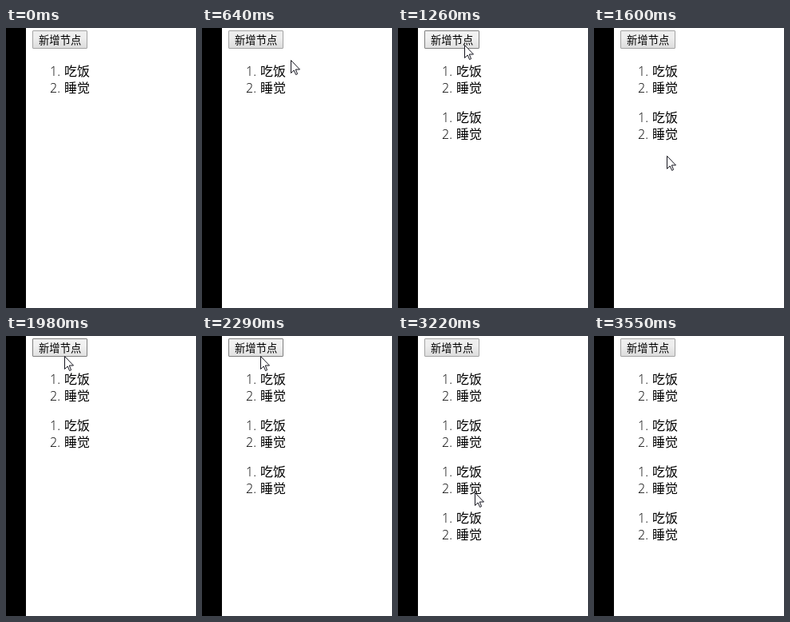
These frames come from a looping animation (238 by 351 pixels, 4160 ms). An HTML page:

```html
<!DOCTYPE html>
<html lang="zh-CN">
<head>
<meta charset="utf-8">
<title>新增节点</title>
<style>
html, body { margin: 0; width: 100%; height: 100%; overflow: hidden; background: #fff; }
svg { display: block; width: 238px; height: 351px; }
text { font-family: "Open Sans", "Noto Sans CJK SC", "Noto Sans CJK", sans-serif; font-weight: 350; fill: #000; }
.item { font-size: 16px; }
.label { font-size: 13.333px; }
</style>
</head>
<body>
<svg viewBox="0 0 238 351">
  <defs>
    <linearGradient id="normal" x2="0" y2="1">
      <stop offset=".38" stop-color="#eee"/><stop offset="1" stop-color="#dcdcdc"/>
    </linearGradient>
    <linearGradient id="hover" x2="0" y2="1">
      <stop offset=".38" stop-color="#f1f1f1"/><stop offset="1" stop-color="#e0e0e0"/>
    </linearGradient>
    <linearGradient id="active" x2="0" y2="1">
      <stop stop-color="#dcdcdc"/><stop offset="1" stop-color="#f4f4f4"/>
    </linearGradient>
  </defs>
  <rect width="238" height="351" fill="#fff"/>
  <rect width="25" height="351" fill="#000"/>
  <rect id="button" x="33.5" y="3.5" width="68" height="22" rx=".5"/>
  <text class="label" x="41" y="20">新增节点</text>
  <g id="lists"></g>
  <path id="cursor" d="M.5 .5V16.5L4.2 13L6.6 18.5L8.6 17.6L6.3 12H11.5Z"
        fill="#fff" stroke="#15151f" stroke-linejoin="round"/>
</svg>
<script>
const LOOP = 4160;
const LEAVE = 3550;
const BORDERS = { normal: "#a3a3a3", hover: "#7f7f7f", active: "#a0a0a0" };

// Pointer strokes: a quadratic curve, sampled every `tick` ms back from its end
const strokes = [
  { start: 380, end: 850, tick: 70, power: 1.3, from: [163, 76], bend: [123, 48], to: [83, 20] },
  { start: 1260, end: 1600, tick: 62, power: 1.4, from: [83, 21], bend: [139, 90], to: [91, 160] },
  { start: 1600, end: 1980, tick: 66, power: 5.4, from: [91, 160], bend: [82, 92], to: [73, 25] },
  { start: 2970, end: 3480, tick: 70, power: 1.35, from: [73, 24], bend: [73, 179], to: [147, 335] }
];
const clicks = [[960, 1090], [2160, 2290], [2900, 2970]];

const $ = id => document.getElementById(id);
const button = $("button"), cursor = $("cursor");

function add(parent, tag, attrs, value = "") {
  const el = document.createElementNS("http://www.w3.org/2000/svg", tag);
  for (const key in attrs) el.setAttribute(key, attrs[key]);
  el.textContent = value;
  return parent.appendChild(el);
}

const lists = [0, 1, 2, 3].map(i => {
  const g = add($("lists"), "g", { transform: `translate(0 ${60 + i * 58})` });
  ["吃饭", "睡觉"].forEach((word, n) => {
    const y = n * 21;
    add(g, "text", { class: "item", x: 55, y }, `${n + 1}.`);
    add(g, "text", { class: "item", x: 73, y }, word);
  });
  return g;
});

function show(el, on) {
  el.setAttribute("visibility", on ? "visible" : "hidden");
}

function pointerAt(t) {
  const s = strokes.findLast(s => t >= s.start);
  if (!s || t >= LEAVE) return null;
  const left = Math.max(0, Math.ceil((s.end - t) / s.tick)) * s.tick;
  const rest = Math.min(1, left / (s.end - s.start)) ** s.power;
  const u = 1 - rest;
  return s.from.map((a, i) =>
    Math.round(rest * rest * a + 2 * rest * u * s.bend[i] + u * u * s.to[i]));
}

function buttonState(t, p) {
  if (clicks.some(([down, up]) => t >= down && t < up)) return "active";
  const over = p && p[0] >= 33 && p[0] < 102 && p[1] >= 3 && p[1] < 26;
  return over ? "hover" : "normal";
}

function render(t) {
  const p = pointerAt(t);
  show(cursor, p);
  if (p) cursor.setAttribute("transform", `translate(${p})`);

  const state = buttonState(t, p);
  button.setAttribute("fill", `url(#${state})`);
  button.setAttribute("stroke", BORDERS[state]);

  const added = clicks.filter(([, up]) => t >= up).length;
  lists.forEach((g, i) => show(g, i <= added));
}

const start = performance.now();
function tick() {
  render((performance.now() - start) % LOOP);
  requestAnimationFrame(tick);
}
tick();
</script>
</body>
</html>
```
